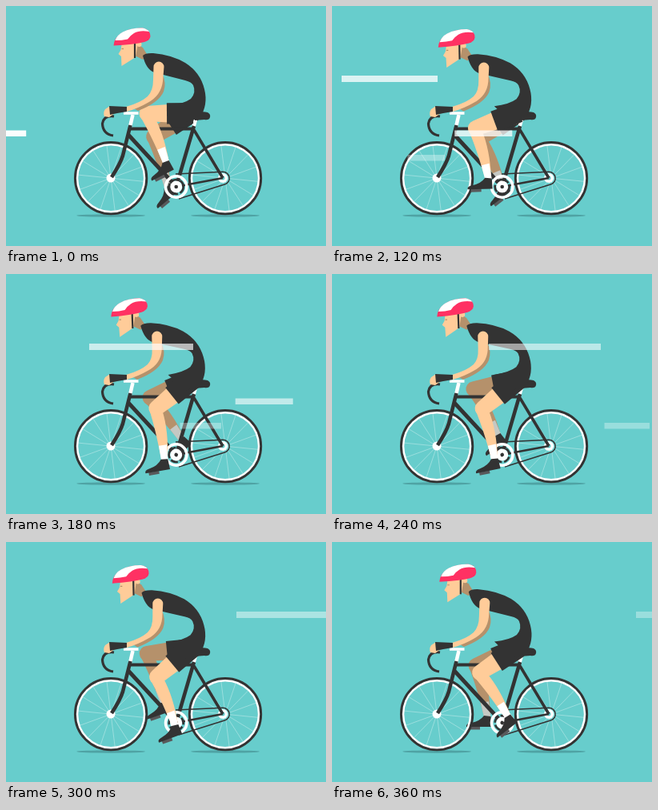
Recreate the animation shown at these times as an HTML page with a canvas. Size 400 px wide and 300 px high, loop 390 ms.

```html
<!DOCTYPE html>
<html lang="en">
<head>
<meta charset="utf-8">
<title>Cyclist</title>
<style>
  html, body { margin: 0; width: 100%; height: 100%; overflow: hidden; background: #67cdcc; }
  canvas { display: block; }
</style>
</head>
<body>
<canvas id="stage" width="400" height="300"></canvas>
<script>
const ctx = document.getElementById('stage').getContext('2d');
const TAU = Math.PI * 2;
const DARK = '#333', WHITE = '#fff', SKIN = '#ffcc99', SHADE = '#b5916b', PINK = '#ff3163';
const HIP = [230, 134], THIGH = 54, SHIN = 66;

// [start ms, motion phase]; twelve phases make a loop
const STEPS = [[0, 0], [90, 1], [120, 3], [150, 4], [180, 5], [240, 7], [270, 8], [300, 9], [330, 10], [360, 11]];

// [phase, ankle x, ankle y, toe-down degrees]
const NEAR = [[0, 200, 196, 27], [1, 194, 210, 8], [4, 196, 220, -2], [5, 198, 233, 10],
  [8, 206, 232, 12], [10, 217, 229, 28], [11, 220, 219, 38]];
const FAR = [[0, 202, 227, 40], [1, 207, 227, 36], [4, 215, 224, 38], [5, 220, 207, 46],
  [8, 201, 200, 30], [10, 193, 204, 8], [11, 194, 219, 0]];

function poseAt(keys, phase) {
  const i = Math.max(1, keys.findIndex(k => k[0] >= phase));
  const a = keys[i - 1], b = keys[i], u = (phase - a[0]) / (b[0] - a[0]);
  return a.slice(1).map((v, j) => v + (b[j + 1] - v) * u);
}

function fill(d, color) {
  ctx.fillStyle = color;
  ctx.fill(new Path2D(d));
}

function line(d, width, color = DARK) {
  ctx.strokeStyle = color;
  ctx.lineWidth = width;
  ctx.stroke(new Path2D(d));
}

function disc(x, y, r, color, ry = r) {
  ctx.fillStyle = color;
  ctx.beginPath();
  ctx.ellipse(x, y, r, ry, 0, 0, TAU);
  ctx.fill();
}

function ring(x, y, r, width, color) {
  ctx.strokeStyle = color;
  ctx.lineWidth = width;
  ctx.beginPath();
  ctx.arc(x, y, r, 0, TAU);
  ctx.stroke();
}

function at(x, y, angle, draw) {
  ctx.save();
  ctx.translate(x, y);
  ctx.rotate(angle);
  draw();
  ctx.restore();
}

function wheel(x) {
  const y = 215.2;
  disc(x, 262, 43, '#4fa3a4', 1.7);
  for (let i = 0; i < 14; i++) {
    const a = i / 14 * TAU + 0.1;
    line(`M${x} ${y}L${x + 41 * Math.cos(a)} ${y + 41 * Math.sin(a)}`, 0.8, 'rgba(255,255,255,.42)');
  }
  ring(x, y, 42.3, 3, WHITE);
  ring(x, y, 44.7, 2.9, DARK);
}

function leg(keys, phase, skin, sock) {
  const [ax, ay, tilt] = poseAt(keys, phase);
  const [hx, hy] = HIP;
  const dx = ax - hx, dy = ay - hy, d = Math.hypot(dx, dy);
  const along = (THIGH ** 2 - SHIN ** 2 + d * d) / (2 * d);
  const out = Math.sqrt(THIGH ** 2 - along ** 2);
  const kx = hx + (dx * along - dy * out) / d;
  const ky = hy + (dy * along + dx * out) / d;

  at(kx, ky, Math.atan2(ay - ky, ax - kx) - Math.PI / 2, () => {
    fill(`M-9 0Q-5 24-3.5 ${SHIN}H4Q11 30 7 4L8 0Z`, skin);
    fill('M-4.2 47L6 47L4.2 68H-3.8Z', sock);
  });
  at(hx, hy, Math.atan2(ky - hy, kx - hx) - Math.PI / 2, () => {
    fill('M-13 0H13L9.5 54A9.5 9.5 0 0 1-9.5 54Z', skin);
    fill('M-13-4H13L13.3 29H-13Z', DARK);
  });
  at(ax, ay, -tilt * Math.PI / 180, () => {
    fill('M-22 11.5H-9V15.5H-22Z', '#59595b');
    fill('M-4-2L4.5-1L5 12H-26Q-27 8-20 7Q-9 5-4-2Z', DARK);
  });
}

function chainring(phase) {
  ring(212.7, 226, 13.2, 3.6, WHITE);
  at(212.7, 226, -phase / 12 * TAU, () => {
    disc(0, 0, 7.5, WHITE);
    ctx.setLineDash([9, 2.8]);
    ring(0, 0, 9, 2.6, DARK);
    ctx.setLineDash([]);
    disc(0, 0, 2.3, DARK);
  });
}

function bike(phase) {
  wheel(131.1);
  wheel(274);
  disc(131, 215, 5.5, WHITE);
  disc(271, 215, 6, WHITE);
  disc(271, 215, 2.5, '#67cdcc');
  line('M212 210L271 207.3A8 8 0 0 1 274 222.8L216 241', 1.5);
  line('M212 226L271 215', 2.6);
  line('M235 155L271 215', 3.6);
  line('M237 142L234.5 151', 4.5, WHITE);
  line('M235 150L213 225', 4.5);
  line('M156 153.5H236', 4);
  line('M153 161L212 225', 4.8);
  line('M158.5 136L155 151', 4.5, WHITE);
  line('M147 134H165.5', 3.5, WHITE);
  line('M155.5 149L146 187Q143 197 132 214', 4.6);
  line('M135 138Q122.5 136 120.5 147Q121 160 134 162', 3.2);
  fill('M234 135Q244 131 252 133Q256 135 255 139Q254 143 248 142L236 143Z', DARK);
  chainring(phase);
}

function head() {
  fill('M162 46L171 52L176 60L171 67L161 62Z', SHADE);
  fill('M145 46L143.5 55L140.5 60L144 63L144.5 75L162 64L165 46Z', SKIN);
  disc(166.5, 48, 3, SKIN);
  line('M144.5 53.5H147', 1.2, SHADE);
  line('M161 45V65', 2.2);
  fill('M134.5 49.5Q135 40 144 34Q156 27 171 27.5Q181 30 180.5 38Q180 43 173 45Q160 48 134.5 49.5Z', PINK);
  fill('M136.5 43Q139 36 146 32.5Q157 27 171 27.5Q177 29 179 32Q167 30 160 34Q155 37 152 41.5Q145 43 136.5 43Z', WHITE);
}

function torso() {
  fill('M171 62Q174 58.5 184 59Q207 61 224 71Q243 83 248 104Q253 124 242 140L224 145L203 124.5Q222 122.5 231 116Q238 108 234 99Q232 95 224 93L185 83Q175 79 171 62Z', DARK);
}

function arm(sx, sy) {
  ctx.save();
  ctx.translate(sx * 0.5, sy * 0.5);
  fill('M195 84Q201 96 197 107Q191 121 165 131L160 128Q186 114 190 86Z', SHADE);
  ctx.restore();
  const p = (x, y, k) => `${x + sx * k} ${y + sy * k}`;
  fill(`M${p(184.5, 76, 1)}A6.5 6.5 0 0 1 ${p(197.5, 76, 1)}L${p(196, 94, 0.6)}` +
    `Q${p(194, 112, 0.3)} 177 121Q165 128 151 132L150 126Q168 121 177 113` +
    `Q${p(184, 106, 0.3)} ${p(184, 92, 0.6)}Z`, SKIN);
  fill('M130 125L124 129Q121 133 123 138L129 139L136 134Z', SKIN);
  fill('M129 125L151 126V132L139 134L130 136Z', DARK);
}

function streak(x, y, w, h, alpha) {
  ctx.fillStyle = `rgba(255,255,255,${alpha})`;
  ctx.fillRect(x, y, w, h);
}

function draw(phase) {
  const lean = (1 - Math.cos(phase / 12 * TAU)) / 2;
  ctx.fillStyle = '#67cdcc';
  ctx.fillRect(0, 0, 400, 300);

  leg(FAR, phase, SHADE, '#c5c8c3');
  bike(phase);
  leg(NEAR, phase, SKIN, WHITE);
  at(240, 135, -0.041 * lean, () => {
    ctx.translate(-240, -135);
    head();
    torso();
  });
  arm(-2.4 * lean, 2.2 * lean);

  const p = phase - 4;
  streak(58 + 46 * p, 87, 125 + 5 * p, 8, 0.92 - 0.053 * phase);
  streak(220 + 66.7 * p, 155.5, 72, 7.5, 0.97 - 0.075 * phase);
  streak(156 + 61.5 * p, 186, 49 + 2.5 * p, 7.5, 0.33);
}

function tick() {
  const t = performance.now() % 390;
  draw(STEPS.findLast(s => s[0] <= t)[1]);
  requestAnimationFrame(tick);
}
tick();
</script>
</body>
</html>
```
